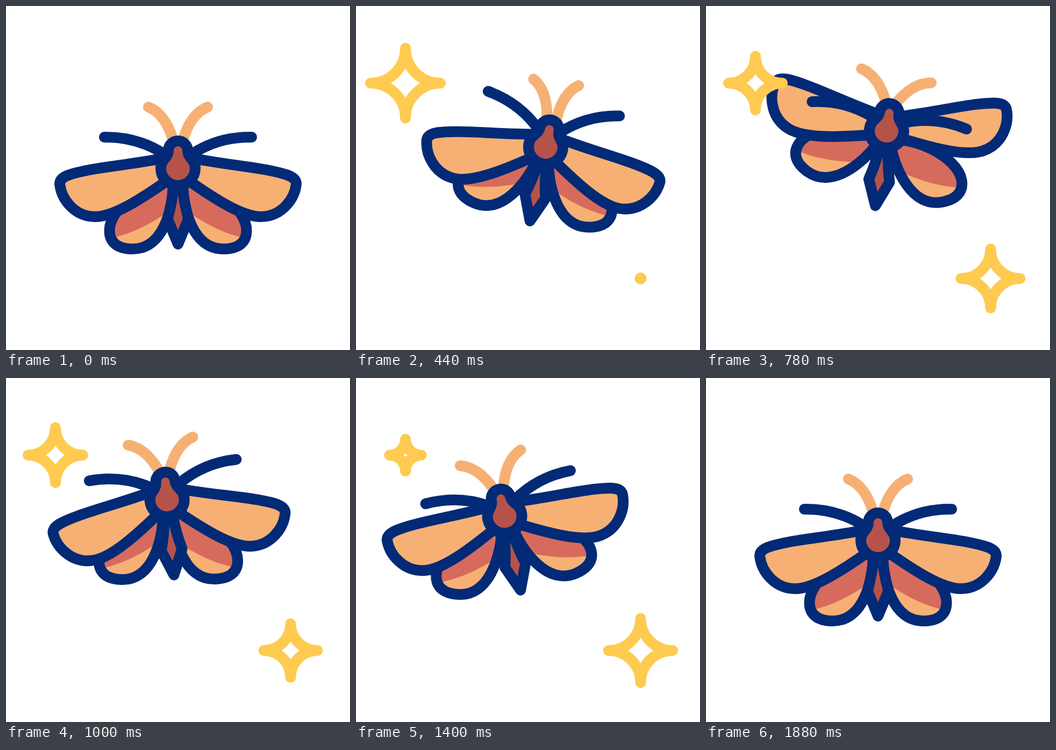
Recreate the animation shown at these times as an HTML page. Size 640 by 640 pixels, loop 2.4 s.

```html
<!DOCTYPE html>
<html lang="en">
<head>
<meta charset="utf-8">
<title>Moth</title>
<style>
  html, body { margin: 0; width: 100%; height: 100%; overflow: hidden; background: #fff; }
  svg { display: block; width: 100%; height: 100%; }
  path { fill: none; stroke-width: 20; stroke-linecap: round; stroke-linejoin: round; }
  .ink { stroke: #032a76; }
  .orange { fill: #f7b074; }
  .pink { fill: #d66b5d; }
  .brown { fill: #b5534a; }
  .feeler { stroke: #f7b074; }
  .star { stroke: #fecb50; }
</style>
</head>
<body>
<svg viewBox="0 0 640 640">
  <defs>
    <g id="hind">
      <path class="orange" d="M329 325C329 380 348 452 404 452C432 452 447.500 440 447.500 418C448 375 375 322 330 322Z"/>
      <path class="pink" d="M330 322C375 322 448 375 447.500 418L445 432Q395 422 340 384Z"/>
      <path class="ink" d="M329 325C329 380 348 452 404 452C432 452 447.500 440 447.500 418C448 375 375 322 330 322Z"/>
    </g>
    <path id="fore" class="ink orange" d="M335 281C400 294 450 298 490 306C520 312 540 317 540 331C537 360 512 392 474 392C440 392 390 360 340 325Z"/>
    <path id="leg" class="ink" d="M457 244Q395 243 345 276"/>
    <path id="feeler" class="feeler" d="M375 188Q343 201 329 250"/>
  </defs>
  <g id="moth">
    <g id="hinds"></g>
    <path class="ink brown" d="M328 335Q331 365 339.500 396L320 443L300.500 396Q309 365 312 335Z"/>
    <g id="fores"></g>
    <g id="feelers"></g>
    <g id="legs"></g>
    <path class="ink brown" d="M302 269A18 18 0 0 1 338 269C338 283 352 285 352 302A32 32 0 0 1 288 302C288 285 302 283 302 269Z"/>
  </g>
  <path id="star1" class="star" transform="translate(92 143.500)"/>
  <path id="star2" class="star" transform="translate(529.500 507)"/>
</svg>
<script>
const LOOP = 2400, STEP = 20, STAR_DELAY = 250;
const $ = id => document.getElementById(id);

// Smooth curve through the keys, without overshoot
function track(times, values) {
  const last = times.length - 1;
  const rise = i => (values[i + 1] - values[i]) / (times[i + 1] - times[i]);
  const slopes = values.map((v, i) => {
    if (i === 0 || i === last) return 0;
    const a = rise(i - 1), b = rise(i);
    return a * b > 0 ? 2 * a * b / (a + b) : 0;
  });
  return t => {
    if (t <= times[0]) return values[0];
    if (t >= times[last]) return values[last];
    let i = 0;
    while (t >= times[i + 1]) i++;
    const h = times[i + 1] - times[i], u = (t - times[i]) / h, w = 1 - u;
    return w * w * ((1 + 2 * u) * values[i] + u * h * slopes[i])
         + u * u * ((3 - 2 * u) * values[i + 1] - w * h * slopes[i + 1]);
  };
}
const pose = (...values) => track([0, 200, 440, 780, 1200, 1600, 1880], values);

const bodyX = pose(320, 340, 353, 336, 275, 280.5, 320);
const bodyY = track([0, 200, 440, 780, 1000, 1200, 1600, 1880], [302, 293, 262, 232, 226, 232, 285, 302]);
const bodyTurn = pose(0, 5, 12, 8.5, -15.5, -6.5, 0);

const foreFlap = track(
  [0, 200, 250, 440, 500, 750, 780, 1000, 1200, 1250, 1550, 1600, 1880],
  [0, 20.7, 23, 0.6, -4, 25.5, 24.5, -4, 20.4, 23, -9, -8.4, 0]);
const hindFlap = track(
  [0, 200, 310, 440, 560, 780, 1060, 1200, 1310, 1600, 1880],
  [0, 10.8, 20, 12, -2, 23, -2, 8.9, 19, -9, 0]);
const foreTilt = pose(0, 1, -1.7, -2, 1.9, 0, 0);
const hindTilt = pose(0, 3.2, 0, 4.3, 5.1, -1.2, 0);

const starSize = track(
  [185, 200, 290, 400, 440, 530, 640, 780, 950, 1080, 1200, 1240, 1350, 1370, 1470],
  [0, 6, 34, 68, 65, 55, 49, 50, 50.5, 53.5, 65, 68, 51.5, 45, 0]);

// Mirrored parts: left and right lift in degrees around a pivot
function pair(name, pivot, left, right) {
  const make = () => {
    const use = document.createElementNS("http://www.w3.org/2000/svg", "use");
    use.setAttribute("href", "#" + name);
    return $(name + "s").appendChild(use);
  };
  const l = make(), r = make();
  return t => {
    l.setAttribute("transform", `translate(640 0) scale(-1 1) rotate(${-left(t)} ${pivot})`);
    r.setAttribute("transform", `rotate(${-right(t)} ${pivot})`);
  };
}
const parts = [
  pair("hind", "320 322", t => hindFlap(t) + hindTilt(t), t => hindFlap(t) - hindTilt(t)),
  pair("fore", "320 292", t => foreFlap(t) + foreTilt(t), t => foreFlap(t) - foreTilt(t)),
  pair("feeler", "329 250", pose(0, 9.5, 6, -8, -7.3, -4, 0), pose(0, 4.5, 16, -14.6, 6.8, -7, 0)),
  pair("leg", "320 302", pose(0, 4.3, 9, -10.2, 1, -5, 0), pose(0, 0, 11.8, -13.3, 15, -16, 0))
];

function drawStar(star, t) {
  const r = starSize(t);
  const arc = `A${r} ${r} 0 0 0 `;
  star.setAttribute("d", r > 0.1 ? `M0 ${-r}${arc}${r} 0${arc}0 ${r}${arc}${-r} 0${arc}0 ${-r}Z` : "");
}

function draw(t) {
  $("moth").setAttribute("transform",
    `translate(${bodyX(t)} ${bodyY(t)}) rotate(${bodyTurn(t)}) translate(-320 -302)`);
  parts.forEach(place => place(t));
  drawStar($("star1"), t);
  drawStar($("star2"), t - STAR_DELAY);
}

const start = performance.now();
function tick() {
  const t = (performance.now() - start) % LOOP;
  draw(Math.floor(t / STEP) * STEP);
  requestAnimationFrame(tick);
}
tick();
</script>
</body>
</html>
```
